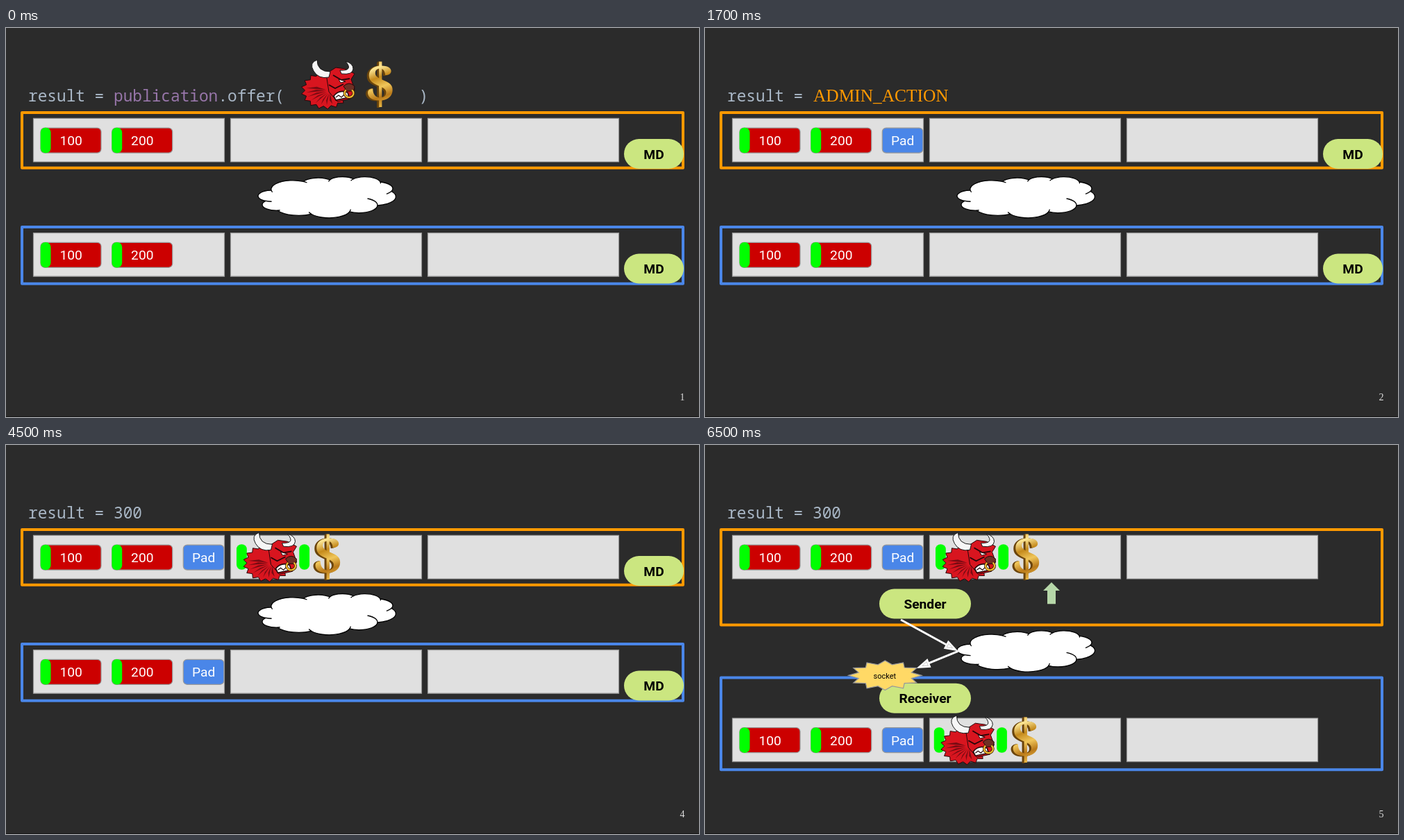
These frames come from a looping animation (998x561 px, 8 s). An HTML page with a canvas:

```html
<!DOCTYPE html>
<html lang="en">
<head>
<meta charset="utf-8">
<title>Publication offer</title>
<style>
  html, body { margin: 0; width: 100%; height: 100%; overflow: hidden; background: #2b2b2b; }
  canvas { display: block; width: 100vw; height: 100vh; }
</style>
</head>
<body>
<canvas id="stage"></canvas>
<script>
const W = 998, H = 561, LOOP = 8000;
const STARTS = [0, 500, 2500, 4500, 6500];
const MONO = '22.78px "Noto Sans Mono", monospace';
const SERIF = '"Liberation Serif", serif';
const SANS = 'Roboto, sans-serif';
const ORANGE = '#ff9900', BLUE = '#4a86e8', LIME = '#cbe680', PALE = '#a9b7c6';
const RED = '#d8151f', DARK = '#25070a', SHADE = '#780b13';

const canvas = document.getElementById('stage');
const ctx = canvas.getContext('2d');

function paint(path, fill, stroke, width = 1) {
  if (fill) { ctx.fillStyle = fill; ctx.fill(path); }
  if (stroke) { ctx.strokeStyle = stroke; ctx.lineWidth = width; ctx.stroke(path); }
}

function box(x, y, w, h, r, fill, stroke, width) {
  const p = new Path2D();
  p.roundRect(x, y, w, h, r);
  paint(p, fill, stroke, width);
}

function text(str, x, y, font, color, align = 'left') {
  ctx.font = font;
  ctx.fillStyle = color;
  ctx.textAlign = align;
  ctx.fillText(str, x, y);
}

function at(x, y, draw) {
  ctx.save();
  ctx.translate(x, y);
  draw();
  ctx.restore();
}

function polygon(points) {
  const p = new Path2D();
  points.forEach(([x, y]) => p.lineTo(x, y));
  p.closePath();
  return p;
}

function star(cx, cy, rx, ry, spikes, inner) {
  return polygon(Array.from({ length: spikes * 2 }, (_, i) => {
    const a = i * Math.PI / spikes, k = i % 2 ? inner : 1;
    return [cx + rx * k * Math.cos(a), cy + ry * k * Math.sin(a)];
  }));
}

// Where two puffs of the cloud meet: x, y, radius of the next puff, and the
// crease in degrees (positive prolongs the last puff, negative leads into the next).
const PUFFS = [
  [39, 144, 68, -12], [140, 52, 53, 12], [224, 34, 44, -18], [298, 25, 49, -18],
  [383, 56, 53, 15], [418, 154, 68, 28], [374, 302, 58, -64], [286, 368, 68, -16],
  [165, 392, 77, 14], [58, 354, 44, -11], [21, 255, 43, -26]
];

function makeCloud(w, h) {
  const squash = 0.735, sx = w / 432, sy = h / 432 / squash;
  const body = new Path2D(), lines = new Path2D();
  PUFFS.forEach(([x1, top, r, lead], i) => {
    const [x2, bottom, , tail] = PUFFS[(i + 1) % PUFFS.length];
    const y1 = top * squash, y2 = bottom * squash;
    const dx = x2 - x1, dy = y2 - y1, d = Math.hypot(dx, dy);
    const k = Math.sqrt(Math.max(0, r * r - d * d / 4)) / d;
    const cx = (x1 + x2) / 2 - dy * k, cy = (y1 + y2) / 2 + dx * k;
    const a = Math.atan2(y1 - cy, x1 - cx), b = Math.atan2(y2 - cy, x2 - cx);
    const arc = (path, from, to) => path.ellipse(cx * sx, cy * sy, r * sx, r * sy, 0, from, to);
    const crease = (from, to) => {
      lines.moveTo((cx + r * Math.cos(from)) * sx, (cy + r * Math.sin(from)) * sy);
      arc(lines, from, to);
    };
    arc(body, a, b);
    if (lead < 0) crease(a + lead * Math.PI / 180, a);
    if (tail > 0) crease(b, b + tail * Math.PI / 180);
  });
  body.closePath();
  return { body, lines };
}
const cloudShape = makeCloud(197, 59.5);

function cloud(y) {
  at(364.4, y, () => {
    paint(cloudShape.body, '#fff', '#000', 1.3);
    paint(cloudShape.lines, null, '#000', 1.3);
  });
}

const MANE = star(35, 44, 35, 27, 17, 0.84);
const FACE = new Path2D('M36 20 L50 11 L64 13 L77 20 L72 28 L77 42 L71 56 L52 60 L40 46 Z');
const MUZZLE = new Path2D('M61 38 Q69 30 77 38 L76 45 L66 45 Z');
const MOUTH = new Path2D('M47 52 Q55 42 67 47 L69 54 L50 58 Z');
const BROW = new Path2D('M46 22 L58 29 L70 27 M40 36 L49 41 L61 35');
const LEFT_HORN = new Path2D('M42 17 Q23 17 23 0 Q11 4 18 16 Q25 28 40 25 Z');
const RIGHT_HORN = new Path2D('M56 15 Q76 16 64 2 Q75 5 75 13 Q74 22 58 20 Z');

function bull(x, y) {
  at(x, y, () => {
    paint(MANE, RED, DARK);
    for (let i = 0; i < 8; i++) {
      const a = 1.2 + i * 0.3, c = Math.cos(a), s = Math.sin(a);
      const lock = polygon([[40 + 4 * c, 44 + 4 * s], [35 + 28 * c, 44 + 21 * s], [38 + 16 * c - 3 * s, 44 + 14 * s + 3 * c]]);
      paint(lock, SHADE);
    }
    paint(FACE, RED, DARK);
    paint(BROW, null, DARK, 1.8);
    paint(polygon([[54, 28], [64, 31], [57, 33]]), '#fff', DARK);
    paint(MUZZLE, '#6f3025', DARK);
    paint(MOUTH, '#fff', DARK, 1.6);
    paint(new Path2D('M50 54 L54 51 L58 54 L62 50 L66 52'), null, DARK, 1.2);
    paint(LEFT_HORN, '#f6f6f6', '#171717');
    paint(RIGHT_HORN, '#f6f6f6', '#171717');
    const ring = new Path2D();
    ring.ellipse(69, 48, 6.5, 6, 0, -0.9, 4);
    paint(ring, null, '#3a2205', 3.8);
    paint(ring, null, '#f2bd32', 2.2);
  });
}

// Gold sign, sized so that the glyph is 65 px high.
function dollar(x, y) {
  const font = size => `bold ${size}px "Noto Serif", serif`;
  const height = 65;
  ctx.textAlign = 'center';
  ctx.font = font(100);
  const m = ctx.measureText('$');
  const scale = height / (m.actualBoundingBoxAscent + m.actualBoundingBoxDescent);
  const base = m.actualBoundingBoxAscent * scale;
  const gold = ctx.createLinearGradient(0, 0, 24, height);
  ['#dfa52f', '#fbe594', '#c58a1c', '#f0c65a', '#b9791a', '#e9b846']
    .forEach((c, i) => gold.addColorStop(i / 5, c));
  at(x, y, () => {
    for (let d = 3; d >= 0; d--) {
      text('$', 22 - d, base + d / 3, font(100 * scale), d ? '#6b450c' : gold, 'center');
    }
  });
}

const header = (x, y) => box(x, y, 14.8, 36.5, 7, '#00ff00');

function message(x, y, label) {
  box(x, y, 87, 36, 5.5, '#cc0000', '#999', 1.2);
  header(x - 0.3, y - 0.3);
  text(label, x + 43.6, y + 25, '19.2px ' + SANS, '#fff', 'center');
}

function pill(x, y, w, label) {
  box(x, y, w, 43, 21.5, LIME);
  text(label, x + w / 2, y + 28.6, 'bold 19.2px ' + SANS, '#000', 'center');
}

function frame(y, h, color) {
  ctx.strokeStyle = color;
  ctx.lineWidth = 4;
  ctx.lineJoin = 'round';
  ctx.strokeRect(23, y, 952, h);
  ctx.lineJoin = 'miter';
}

function buffers(y, padded) {
  for (let i = 0; i < 3; i++) box(39.5 + 284 * i, y, 275, 62.6, 0, '#e0e0e0', '#999', 1.2);
  message(50, y + 13.7, '100');
  message(152.7, y + 13.7, '200');
  if (!padded) return;
  box(255.3, y + 13.7, 58.6, 36, 5.5, BLUE, '#999', 1.2);
  text('Pad', 284.6, y + 38.7, '19.2px ' + SANS, '#fff', 'center');
}

function payload(x, y) {
  header(x, y);
  header(x + 90.3, y);
  bull(x + 9.5, y - 17);
  dollar(x + 109.5, y - 14.5);
}

function arrow(x1, y1, x2, y2) {
  const len = Math.hypot(x2 - x1, y2 - y1);
  at(x1, y1, () => {
    ctx.rotate(Math.atan2(y2 - y1, x2 - x1));
    paint(new Path2D(`M0 0 H${len - 12}`), null, '#fff', 3);
    paint(polygon([[len, 0], [len - 20, -6.8], [len - 20, 6.8]]), '#fff');
    paint(polygon([[len - 9, 0], [len - 17, -3], [len - 17, 3]]), null, '#bbb', 0.7);
  });
}

function socket(cx, cy) {
  paint(star(cx, cy, 52.5, 21.3, 12, 0.75), '#ffd966', '#999', 1.2);
  text('socket', cx - 0.5, cy + 4.3, '11px ' + SANS, '#000', 'center');
}

function command(step) {
  const col = n => 32 + n * 13.67;
  text('result =', col(0), 106, MONO, PALE);
  if (step === 1) {
    text('ADMIN_ACTION', 156, 106, '25.4px ' + SERIF, ORANGE);
  } else if (step > 2) {
    text('300', col(9), 106, MONO, PALE);
  } else {
    text('publication', col(9), 106, MONO, '#9876aa');
    text('.offer(', col(20), 106, MONO, PALE);
    text(')', col(41) + 2, 106, MONO, PALE);
    bull(425, 46);
    dollar(517, 49);
  }
}

function scene(step) {
  const wide = step === 4;
  ctx.fillStyle = '#2b2b2b';
  ctx.fillRect(0, 0, W, H);
  ctx.fillStyle = '#151515';
  ctx.fillRect(0, 560, W, 1);

  frame(122, wide ? 137.5 : 79.7, ORANGE);
  frame(wide ? 335.5 : 287, wide ? 132.7 : 81.7, BLUE);
  buffers(130.4, step > 0);
  buffers(wide ? 394 : 295.6, step > 1);
  command(step);
  cloud(wide ? 267.6 : 214.3);

  if (step > 2) payload(332, 143.3);
  if (wide) {
    payload(329.8, 407.2);
    pill(251, 207.5, 132, 'Sender');
    pill(251, 343.7, 132, 'Receiver');
    arrow(282, 252, 364.5, 297.3);
    arrow(364.5, 297.3, 304.5, 322);
    socket(259.3, 332.3);
    paint(new Path2D('M499 198 l12 12 h-6 v19.3 h-12 v-19.3 h-6 Z'), '#b6d7a8');
  } else {
    pill(890, 160, 86, 'MD');
    pill(890, 325.5, 86, 'MD');
  }
  text(String(step + 1), 977.5, 537, '14px ' + SERIF, '#ddd', 'right');
}

const began = performance.now();

function tick() {
  const time = (performance.now() - began) % LOOP;
  const dpr = window.devicePixelRatio || 1;
  const w = Math.round(W * dpr), h = Math.round(H * dpr);
  if (canvas.width !== w || canvas.height !== h) {
    canvas.width = w;
    canvas.height = h;
  }
  ctx.setTransform(dpr, 0, 0, dpr, 0, 0);
  scene(STARTS.filter(s => s <= time).length - 1);
  requestAnimationFrame(tick);
}
tick();
</script>
</body>
</html>
```
